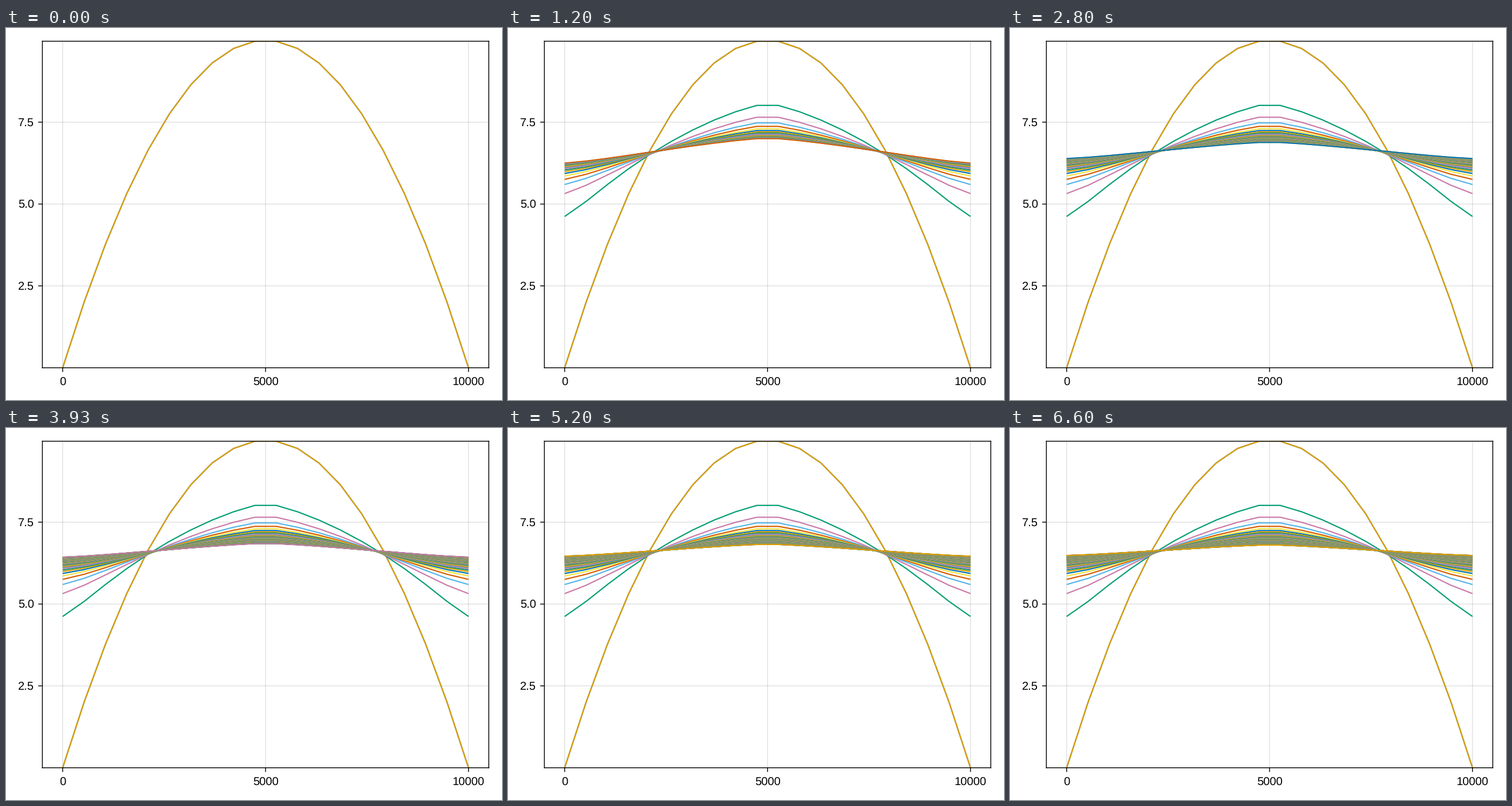
Recreate the animation shown at these times as a matplotlib script. Size 864 by 648 pixels, loop 6.67 s.

```python
import numpy as np
import matplotlib.pyplot as plt
from matplotlib.animation import FuncAnimation

W, H, DPI = 864, 648, 72          # at 72 dpi one point is one pixel
U = 1.44                          # pixels per layout unit
FRAMES, LOOP = 100, 6670
LEFT, RIGHT, TOP, BOTTOM = 44 * U, 584 * U, 16 * U, 411 * U
PALETTE = ["#0072B2", "#E69F00", "#009E73", "#CC79A7",
           "#56B4E9", "#D55E00", "#F0E442"]
FIRST_EDGE = 4.62                 # edge thickness after one frame of flow

plt.rcParams.update({
    "path.snap": False,
    "text.hinting": "none",
    "font.family": "Liberation Sans",
    "font.size": 14 * U,
    "lines.solid_capstyle": "butt",
    "lines.solid_joinstyle": "miter",
})

x = np.linspace(0, 10000, 20)
start = 10 * (1 - (x / 5000 - 1) ** 2)
cell = np.ones_like(x)
cell[[0, -1]] = 0.5


def step(h, limit=np.inf):
    """One explicit step of shallow-ice flow (n = 3) with closed ends."""
    slope = np.diff(h)
    diffusivity = ((h[1:] + h[:-1]) / 2) ** 5 * slope ** 2
    dt = min(0.02 / diffusivity.max(), limit)
    change = np.diff(diffusivity * slope, prepend=0, append=0) / cell
    return h + dt * change, dt


def simulate():
    h, unit = start, 0.0
    while h[0] < FIRST_EDGE:
        h, dt = step(h)
        unit += dt
    states = [start, h]
    while len(states) < FRAMES:
        left = unit
        while left > 1e-12 * unit:
            h, dt = step(h, left)
            left -= dt
        states.append(h)
    return states


fig = plt.figure(figsize=(W / DPI, H / DPI), dpi=DPI, facecolor="white")
ax = fig.add_axes([LEFT / W, 1 - BOTTOM / H,
                   (RIGHT - LEFT) / W, (BOTTOM - TOP) / H])
ax.set(xlim=(-500, 10500), ylim=(0, start.max()), xticks=[], yticks=[])
for spine in ax.spines.values():
    spine.set_linewidth(U)


def px_line(xs, ys, **style):
    """Line in pixels from the top left corner of the stage."""
    fig.add_artist(plt.Line2D(np.array(xs) / W, 1 - np.array(ys) / H,
                              lw=U, color="black", **style))


def px_text(px, py, label, ha):
    fig.text(px / W, 1 - py / H, label, ha=ha, va="baseline", color="black")


for v in (0, 5000, 10000):
    px = LEFT + (v + 500) / 11000 * (RIGHT - LEFT)
    ax.axvline(v, color="black", alpha=0.12, lw=U, zorder=0.5)
    px_line([px, px], [BOTTOM, BOTTOM + 5 * U])
    px_text(px, 623, str(v), "center")

for v in (2.5, 5.0, 7.5):
    py = BOTTOM - v / start.max() * (BOTTOM - TOP)
    ax.axhline(v, color="black", alpha=0.12, lw=U, zorder=0.5)
    px_line([LEFT - 5 * U, LEFT], [py, py])
    px_text(LEFT - 10 * U, py + 7.2, f"{v:.1f}", "right")

# The starting profile is plotted twice, then one curve joins per frame.
curves = [ax.plot(x, h, color=PALETTE[k % 7], lw=1.5 * U)[0]
          for k, h in enumerate([start] + simulate())]


def update(frame):
    for k, curve in enumerate(curves):
        curve.set_visible(k <= frame + 1)
    return curves


anim = FuncAnimation(fig, update, frames=FRAMES, interval=LOOP / FRAMES,
                     repeat=True, repeat_delay=0, blit=False)
plt.show()
```
